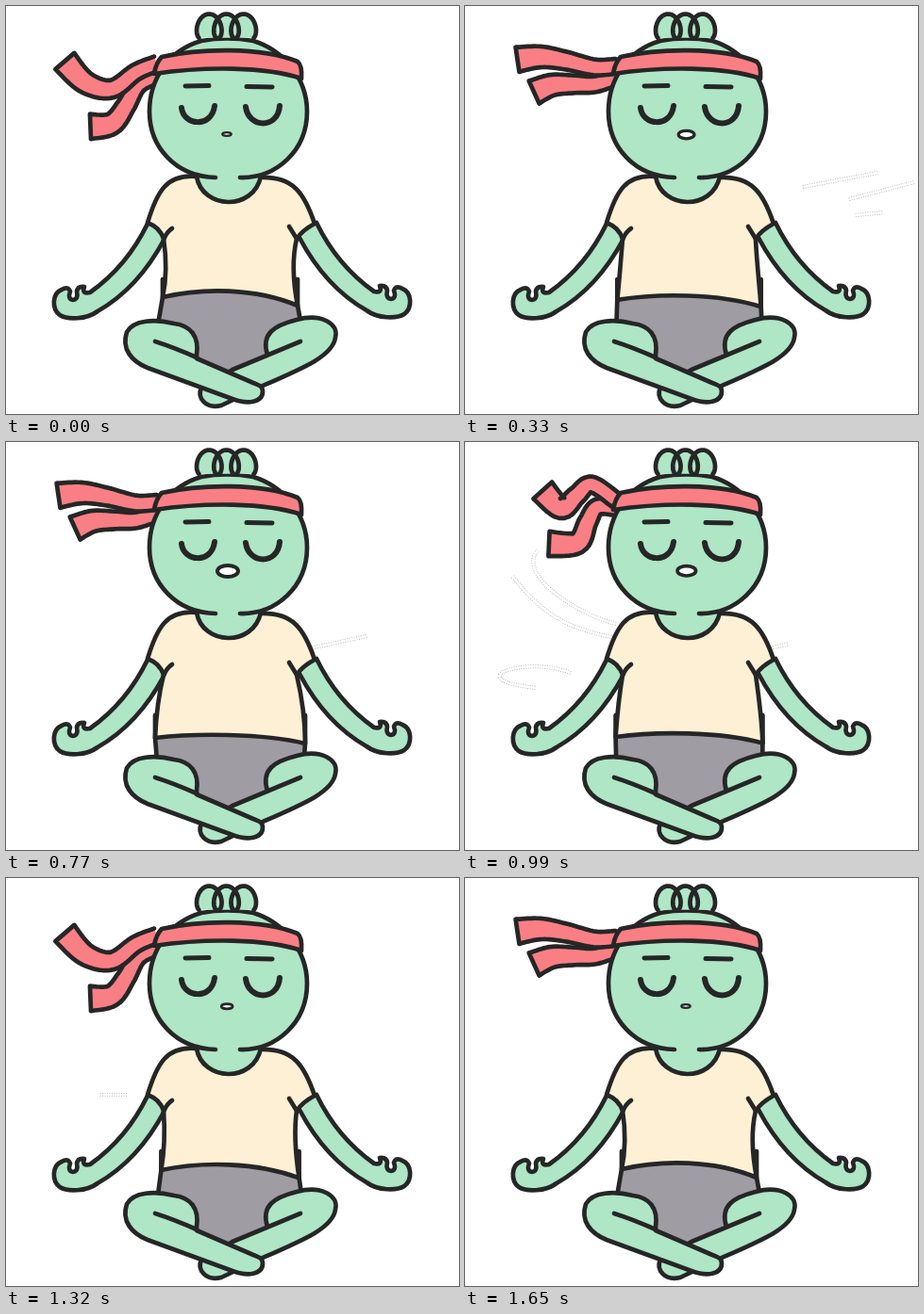
Animation of 480x433 px, one loop 1760 ms. Source, as an HTML page with a canvas:

```html
<!DOCTYPE html>
<html lang="en">
<head>
<meta charset="utf-8">
<title>Breathing</title>
<style>
html, body { margin: 0; width: 100%; height: 100%; overflow: hidden; background: #fff; }
canvas { display: block; }
</style>
</head>
<body>
<canvas id="stage" width="480" height="433"></canvas>
<script>
const ctx = document.getElementById('stage').getContext('2d');
const STEP = 110, STEPS = 16;
const INK = '#262626', SKIN = '#aee6c6', RED = '#fa7f84', CREAM = '#fdf0d5', GREY = '#a09ca3';

const mix = (a, b, t) => a + (b - a) * t;
const mixPoint = (p, q, t) => p.map((v, i) => mix(v, q[i], t));
const clamp = t => Math.min(1, Math.max(0, t));
const ease = t => (t = clamp(t), t * t * (3 - 2 * t));
// Breathe in over the first third, hold, then let go slowly.
const breath = step => ease(step / 5.4) - ease((step - 7) / 7);

function shape(d, fill, width = 4.7) {
  const path = new Path2D(d);
  if (fill) {
    ctx.fillStyle = fill;
    ctx.fill(path);
  }
  ctx.strokeStyle = INK;
  ctx.lineWidth = width;
  ctx.stroke(path);
}

const polyline = points => 'M' + points.map(p => p.join(' ')).join('L');

// Catmull-Rom curve through a few points, t from 0 to 1.
function spline(points, t) {
  const last = points.length - 1;
  const i = Math.min(last - 1, Math.floor(t * last)), u = t * last - i;
  const b = points[i], c = points[i + 1];
  const a = points[i - 1] || b, d = points[i + 2] || c;
  return b.map((_, k) => b[k] + u / 2 * (c[k] - a[k] +
    u * (2 * a[k] - 5 * b[k] + 4 * c[k] - d[k] + u * (3 * (b[k] - c[k]) + d[k] - a[k]))));
}

// Centre lines of both headband tails, from knot to tip.
const DROOP = {
  long: [[160, 61], [138, 70], [112, 88], [84, 81], [61, 57]],
  short: [[160, 74], [140, 84], [127, 106], [112, 125], [88, 128]]
};
const CURL = {
  long: [[160, 62], [134, 45], [118, 57], [102, 70], [81, 50]],
  short: [[160, 70], [140, 69], [130, 85], [119, 107], [87, 108]]
};
const STREAM = {
  long: [[160, 64], [137, 65], [107, 58], [80, 54], [54, 57]],
  short: [[160, 76], [138, 83], [115, 83], [92, 84], [72, 92]]
};
const between = key => CURL[key].map((p, i) => mixPoint(p, STREAM[key][i], .5));
const FLAP = [DROOP, CURL, { long: between('long'), short: between('short') }, STREAM];

function tail(centre) {
  const upper = [], lower = [];
  for (let t = 0; t <= 1; t += .025) {
    const [x, y] = spline(centre, t);
    const [x0, y0] = spline(centre, Math.max(0, t - .01));
    const [x1, y1] = spline(centre, Math.min(1, t + .01));
    const half = mix(8, 13.5, t * t) / Math.hypot(x1 - x0, y1 - y0);
    const dx = (y1 - y0) * half, dy = (x0 - x1) * half;
    upper.push([x + dx, y + dy]);
    lower.unshift([x - dx, y - dy]);
  }
  shape(polyline([...upper, ...lower]), RED);
}

// Pale air trails: each grows for two steps, then its end catches up.
const TRAILS = [
  { born: 1, curve: [[358, 192], [437, 177]] },
  { born: 1, curve: [[407, 205], [476, 187]] },
  { born: 1, curve: [[414, 222], [444, 219]] },
  { born: 5, curve: [[382, 206], [322, 219]] },
  { born: 7, curve: [[160, 193], [122, 184], [54, 142], [77, 115]] },
  { born: 7, curve: [[155, 207], [112, 198], [84, 186], [50, 142]] },
  { born: 7, curve: [[112, 245], [66, 226], [-11, 252], [76, 261]] },
  { born: 10, curve: [[128, 230], [98, 230]] }
];

function bezier(points, t) {
  while (points.length > 1) points = points.slice(1).map((p, i) => mixPoint(points[i], p, t));
  return points[0];
}

function trail({ born, curve }, step) {
  const age = step - born;
  const from = clamp((age - 2) / 3), to = clamp(age / 2);
  if (from >= to) return;
  ctx.beginPath();
  for (let i = 0; i <= 30; i++) ctx.lineTo(...bezier(curve, mix(from, to, i / 30)));
  ctx.save();
  ctx.lineCap = 'butt';
  ctx.setLineDash([1, 1.5]);
  ctx.strokeStyle = '#a4a49c';
  ctx.lineWidth = 4;
  ctx.stroke();
  ctx.setLineDash([]);
  ctx.strokeStyle = '#fff';
  ctx.lineWidth = 2.6;
  ctx.stroke();
  ctx.restore();
}

function arm() {
  shape('M150 231C135 262 113 287 89 304Q80 306 83 298Q76 297 75 303Q77 311 71 312' +
    'Q65 311 68 303Q66 297 59 301C49 305 48 321 57 328' +
    'C65 333 85 333 97 324C125 308 150 281 168 247', SKIN);
}

function torso(v) {
  const left = mix(166, 158, v), leftY = mix(309, 314, v);
  const right = mix(309, 317, v), rightY = mix(318, 320, v);
  const waist = mix(299, 309, v);
  shape(`M${left} ${leftY}L${mix(161, 160, v)} 338L210 390H265L${mix(312, 316, v)} 334` +
    `L${right} ${rightY}V290H${left}Z`, GREY);
  shape('M202 181C170 178 160 197 150 230Q163 235 167 247' +
    `C${mix(170, 162, v)} 267 ${mix(170, 159, v)} 290 ${left} ${leftY}` +
    `C${left + 42} ${waist} ${right - 45} ${waist} ${right} ${rightY}` +
    `C${mix(304, 317, v)} 292 ${mix(303, 313, v)} 268 308 247` +
    'Q314 238 327 231C316 198 304 181 270 182', CREAM);
  shape('M176 236Q170 240 167 248M300 234L308 247');
}

function legs() {
  shape('M277 370C270 348 284 339 308 333C334 326 353 337 349 352C346 371 318 383 272 403' +
    'L228 424C212 428 202 416 207 405L240 386L312 356', SKIN);
  shape('M202 370C205 350 195 339 178 337C158 332 135 333 128 346C122 364 133 377 150 384' +
    'L240 417C256 423 272 421 272 409C272 403 267 402 262 400L202 374Z', SKIN);
  shape('M158 356Q177 362 202 373');
}

// A looping scribble: a trochoid with three humps.
function hair() {
  const curl = [];
  for (let a = -9.1; a <= 9.1; a += .1) {
    curl.push([233.5 + 2.9 * a + 8.2 * Math.sin(a), 21.5 - 13 * Math.cos(a)]);
  }
  shape(polyline(curl), SKIN);
}

function head(v) {
  shape('M202 181C208 216 262 218 270 181', SKIN);
  ctx.fillStyle = SKIN;
  ctx.fillRect(205, 172, 62, 12);
  shape('M222 182C180 181 152 150 152 112C152 78 172 47 207 37Q234 32 262 37' +
    'C292 46 319 75 319 112C319 154 286 183 248 182', SKIN);
  hair();
  shape('M165 54C205 45 270 43 309 59Q314 63 313 77C275 64 210 64 157 72Q159 60 165 54Z', RED);
  shape('M190 85L215 84.5M255 85.5L282 86', null, 5);
  shape('M186 108C188 127 218 130 221 106M254 107C257 130 288 131 290 106', null, 6);

  ctx.beginPath();
  ctx.ellipse(mix(234, 235, v), mix(136, 137, v), mix(4.7, 11, v), mix(1.8, 6, v), 0, 0, Math.PI * 2);
  ctx.fillStyle = '#fff';
  ctx.fill();
  ctx.lineWidth = mix(2.3, 4, v);
  ctx.stroke();
}

function draw(now) {
  const step = Math.floor(now / STEP) % STEPS;
  const v = breath(step), flap = FLAP[step % FLAP.length];
  ctx.fillStyle = '#fff';
  ctx.fillRect(0, 0, 480, 433);
  ctx.lineCap = ctx.lineJoin = 'round';
  TRAILS.forEach(t => trail(t, step));
  arm();
  ctx.save();
  ctx.translate(479, -1);
  ctx.scale(-1, 1);
  arm();
  ctx.restore();
  torso(v);
  legs();
  tail(flap.short);
  tail(flap.long);
  head(v);
}

const start = performance.now();
function tick() {
  draw(performance.now() - start);
  requestAnimationFrame(tick);
}
tick();
</script>
</body>
</html>
```
